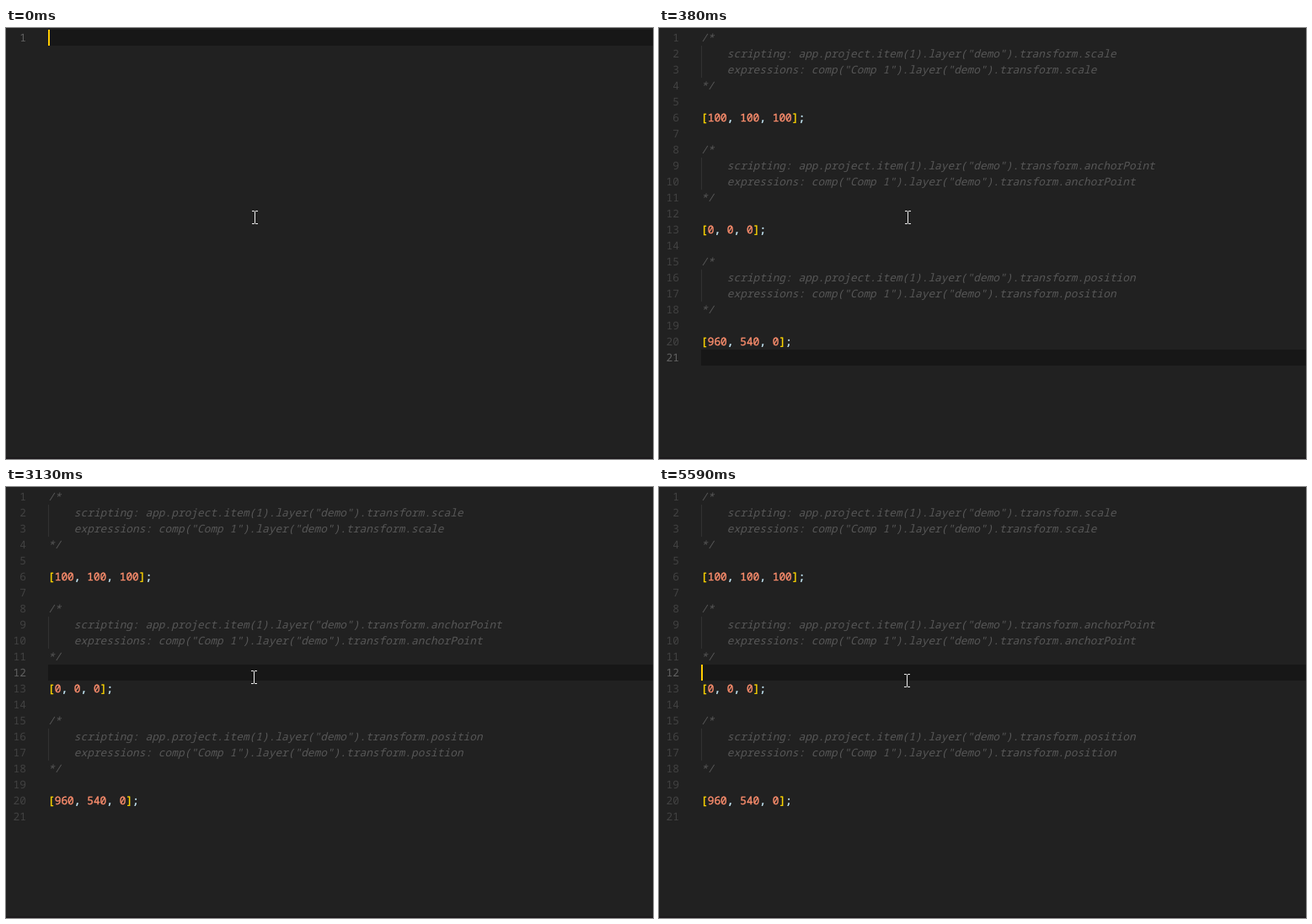
An HTML page for the animation above (5.64 s loop, 768x512 px).

```html
<!DOCTYPE html>
<html lang="en">
<head>
<meta charset="utf-8">
<title>Formatting code in an editor</title>
<style>
  html, body { margin: 0; width: 100%; height: 100%; overflow: hidden; background: #212121; }
  svg { display: block; }
  text {
    font: 12.83px "Noto Sans Mono", "DejaVu Sans Mono", monospace;
    white-space: pre;
    text-rendering: geometricPrecision;
  }
  .comment { fill: #575757; font-style: italic; }
  .number { fill: #ff8f6e; stroke: #ff8f6e; }
  .bracket { fill: #ffd700; stroke: #ffd700; }
  .mark { fill: #c8ecfa; stroke: #c8ecfa; }
  .number, .bracket, .mark { stroke-width: 0.35px; }
  .gutter { fill: #424242; text-anchor: end; }
  .gutter.active { fill: #616161; }
  .band { fill: #171717; }
  .caret { fill: #ffcc00; }
  .selection { fill: #2c2c2c; }
  .guide { fill: #323232; }
  .pointer { fill: #f0f0f0; }
</style>
</head>
<body>
<svg id="stage" width="768" height="512" viewBox="0 0 768 512"></svg>
<script>
const LOOP = 5640, LEFT = 50, TOP = 2, ROW = 19, CHAR = 7.698;
const stage = document.getElementById("stage");
const rowTop = n => TOP + ROW * (n - 1);

function add(parent, tag, attrs, content) {
  const el = document.createElementNS("http://www.w3.org/2000/svg", tag);
  for (const key in attrs) el.setAttribute(key, attrs[key]);
  if (content !== undefined) el.textContent = content;
  parent.append(el);
  return el;
}

const block = (prop, value) => [
  "/*",
  `    scripting: app.project.item(1).layer("demo").transform.${prop}`,
  `    expressions: comp("Comp 1").layer("demo").transform.${prop}`,
  "*/",
  "",
  `[${value}];`
];
const blocks = [
  block("scale", "100, 100, 100"),
  block("anchorPoint", "0, 0, 0"),
  block("position", "960, 540, 0")
];
const joined = gap => blocks.flatMap((b, i) => i ? [...Array(gap).fill(""), ...b] : b);

function tokens(line) {
  if (line[0] !== "[") return [["comment", line]];
  const kind = s => /\d/.test(s) ? "number" : /[[\]]/.test(s) ? "bracket" : "mark";
  return line.match(/\d+|[[\]]|, |;/g).map(s => [kind(s), s]);
}

// Selected row including its line break, rounded where it stands out from its neighbours.
function drawSelection(parent, lines, n) {
  const width = i => i < 0 || i >= lines.length ? 0 : (lines[i].length + 1) * CHAR;
  const w = width(n - 1), y = rowTop(n);
  const r1 = w > width(n - 2) ? 3 : 0, r2 = w > width(n) ? 3 : 0;
  add(parent, "path", {
    class: "selection",
    d: `M${LEFT} ${y}h${w - r1}q${r1} 0 ${r1} ${r1}v${ROW - r1 - r2}q0 ${r2} ${-r2} ${r2}H${LEFT}z`
  });
}

function makeView(lines, { selected = false, guides = false } = {}) {
  const group = add(stage, "g", {});
  if (selected) {
    const chosen = lines.slice(0, -1);
    chosen.forEach((_, i) => drawSelection(group, chosen, i + 1));
  }
  const gutter = lines.map((line, i) => {
    const y = rowTop(i + 1), base = y + 14;
    if (guides && line.startsWith("    "))
      add(group, "rect", { class: "guide", x: LEFT, y, width: 1, height: ROW });
    if (line) {
      const text = add(group, "text", { x: LEFT, y: base, "xml:space": "preserve" });
      for (const [kind, s] of tokens(line)) add(text, "tspan", { class: kind }, s);
    }
    return add(group, "text", { class: "gutter", x: 24, y: base }, i + 1);
  });
  return { group, gutter };
}

const band = add(stage, "rect", { class: "band", x: LEFT, width: 718, height: ROW });
const views = {
  empty: makeView([""]),
  raw: makeView(["", ...joined(2), ""], { selected: true }),
  tidy: makeView([...joined(1), ""], { guides: true })
};
const caret = add(stage, "rect", { class: "caret", x: LEFT, width: 2, height: ROW });
add(stage, "rect", { x: 0, y: 510, width: 768, height: 2, fill: "#1c1a1c" });
const pointer = add(stage, "path", {
  class: "pointer",
  d: "M-3-8h3v1h-3zM1-8h3v1h-3zM0-7h1v14h-1zM-3 7h3v1h-3zM1 7h3v1h-3z"
});

// [time, value] steps; each value holds until the next.
const viewSteps = [[0, "empty"], [280, "raw"], [380, "tidy"]];
const lineSteps = [[0, 1], [280, 24], [380, 21], [660, 12]];
const caretSteps = [[0, 1], [100, 0], [660, 1], [1150, 0], [1630, 1], [2140, 0], [2620, 1],
  [3130, 0], [3640, 1], [4070, 0], [4620, 1], [5080, 0], [5590, 1]];
const pointerSteps = [[0, [295, 225]], [870, [295, 226]], [1680, [294, 226]], [4900, [294, 227]],
  [5460, [294, 228]], [5540, [294, 229]], [5590, [294, 230]]];
const at = (steps, t) => steps.findLast(step => step[0] <= t)[1];
const show = (el, on) => el.setAttribute("visibility", on ? "visible" : "hidden");

function draw(t) {
  const name = at(viewSteps, t), line = at(lineSteps, t), y = rowTop(line);
  for (const key in views) show(views[key].group, key === name);
  views[name].gutter.forEach((el, i) => el.classList.toggle("active", i + 1 === line));
  band.setAttribute("y", y);
  show(band, name !== "raw");
  caret.setAttribute("y", y);
  show(caret, at(caretSteps, t));
  pointer.setAttribute("transform", `translate(${at(pointerSteps, t)})`);
}

const start = performance.now();
function tick() {
  draw((performance.now() - start) % LOOP);
  requestAnimationFrame(tick);
}
tick();
</script>
</body>
</html>
```
